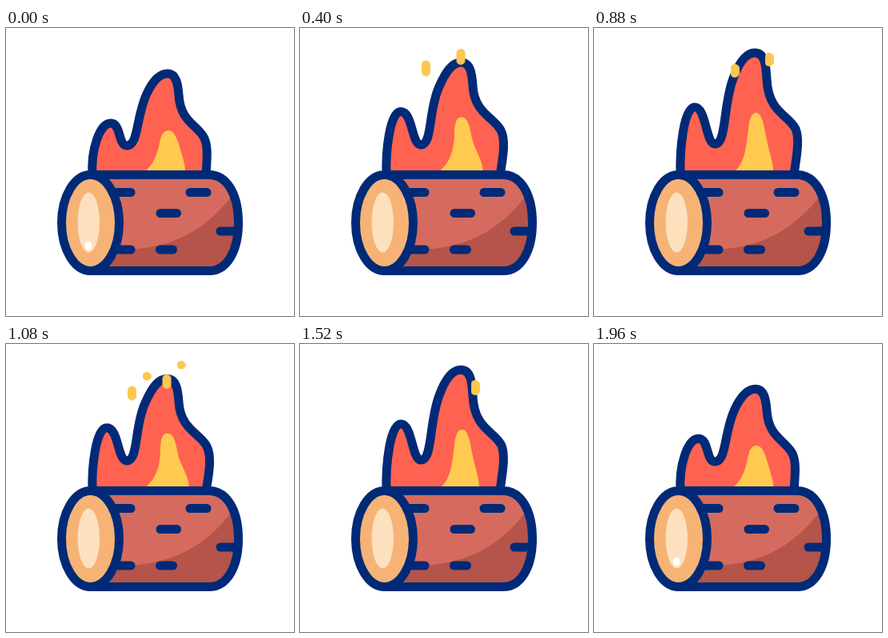
Animation, 360 px wide and 360 px high, one loop 2 s. Source, as an HTML page:

```html
<!DOCTYPE html>
<html lang="en">
<head>
<meta charset="utf-8">
<title>Campfire</title>
<style>
  html, body { margin: 0; width: 100%; height: 100%; overflow: hidden; background: #fff; }
  svg { display: block; width: 100vw; height: 100vh; }

  .ink { fill: none; stroke: #002a77; stroke-width: 11; stroke-linecap: round; stroke-linejoin: round; }

  /* The flame flickers three times per 2 s loop */
  .flame, .core, .glint { animation: 666.6667ms ease-in-out infinite; }
  .flame { fill: #ff6250; stroke: #002a77; stroke-width: 11; animation-name: flame; }
  .core { fill: #ffca4f; animation-name: core; }
  .glint { fill: #fff; animation-name: glint; }

  @keyframes flame {
    0%, 100% { d: path("M108 184 C106 152 117 119 131 119 C144 119 140 147 151 147 C166 147 162 112 176 82 C184 65 193 57 202 57 C213 57 215 71 216 84 C218 118 240 121 248 138 C253 149 251 165 250 184"); }
    33.333% { d: path("M108 184 C107 152 112 99 126 99 C140 99 140 145 151 145 C166 145 161 97 174 63 C181 44 190 31 201 31 C214 31 215 48 216 64 C218 106 243 108 252 126 C258 141 252 165 250 184"); }
    66.667% { d: path("M108 184 C107 155 112 105 126 105 C141 105 139 145 151 146 C166 146 160 103 174 74 C182 56 190 44 201 44 C213 44 215 58 216 73 C218 107 243 112 251 128 C258 142 253 165 250 184"); }
  }
  @keyframes core {
    0%, 100% { d: path("M173 180 C188 168 190 151 193 139 C195 131 199 128 203 128 C211 128 215 141 218 152 C222 165 224 172 224 180"); }
    33.333% { d: path("M175 180 C190 168 190 146 193 126 C194 112 198 106 202 106 C210 106 212 119 215 135 C218 153 224 166 224 180"); }
    66.667% { d: path("M173 180 C190 167 193 148 193 131 C193 119 196 112 201 112 C211 112 212 125 215 138 C218 152 229 164 229 180"); }
  }
  @keyframes glint {
    0%, 13% { opacity: 1; }
    13.1%, 90% { opacity: 0; }
    90.1%, 100% { opacity: 1; }
  }

  .spark {
    fill: #fdc74f; width: 11px; opacity: 0;
    animation: spark 2s linear calc(var(--at) - 2s) infinite;
  }
  @keyframes spark {
    0%, 6.49% { opacity: 0; y: 63.5px; height: 11px; }
    6.5% { opacity: 1; y: 63.5px; height: 11px; }
    8% { y: 61px; height: 13px; }
    14% { y: 49px; height: 18px; }
    16% { y: 45px; height: 19px; }
    20% { y: 37px; height: 20px; }
    28% { y: 25px; height: 14px; }
    34% { y: 21px; height: 10.5px; }
    35% { opacity: 1; y: 20px; height: 10px; }
    35.01%, 100% { opacity: 0; y: 20px; height: 10px; }
  }
</style>
</head>
<body>
<svg viewBox="0 0 360 360">
  <defs>
    <path id="body" d="M105.5 183.5 H254 C276 183.5 290.5 208 290.5 243.5 S276 303.5 254 303.5 H105.5 Z"/>
    <clipPath id="inside"><use href="#body"/></clipPath>
  </defs>

  <path class="flame"/>
  <path class="core"/>

  <use href="#body" fill="#d56b5e"/>
  <path clip-path="url(#inside)" fill="#b5544a" d="M287 203 C258 245 215 277 145 277 L120 304 H296 V203 Z"/>
  <use href="#body" class="ink"/>
  <path class="ink" d="M136 205.5 H156 M230 205.5 H251 M193 231.5 H213.5 M268 254 H288 M136 277 H156 M192.5 277 H208.5"/>
  <ellipse class="ink" cx="105.5" cy="243.5" rx="36" ry="60" style="fill:#f7b376"/>
  <ellipse cx="103.3" cy="243" rx="13.7" ry="37.5" fill="#fde0be"/>
  <ellipse class="glint" cx="103" cy="272" rx="4.5" ry="5.5"/>

  <g transform="translate(152 3.5)">
    <rect class="spark" rx="5.3" style="--at:0s"/>
    <rect class="spark" rx="5.3" style="--at:.8s"/>
  </g>
  <g transform="translate(195.5 -11)">
    <rect class="spark" rx="5.3" style="--at:0s"/>
    <rect class="spark" rx="5.3" style="--at:.8s"/>
  </g>
  <g transform="translate(170.5 14)">
    <rect class="spark" rx="5.3" style="--at:.4s"/>
  </g>
  <g transform="translate(213.5 0)">
    <rect class="spark" rx="5.3" style="--at:.4s"/>
    <rect class="spark" rx="5.3" style="--at:1.2s"/>
  </g>
</svg>
</body>
</html>
```
